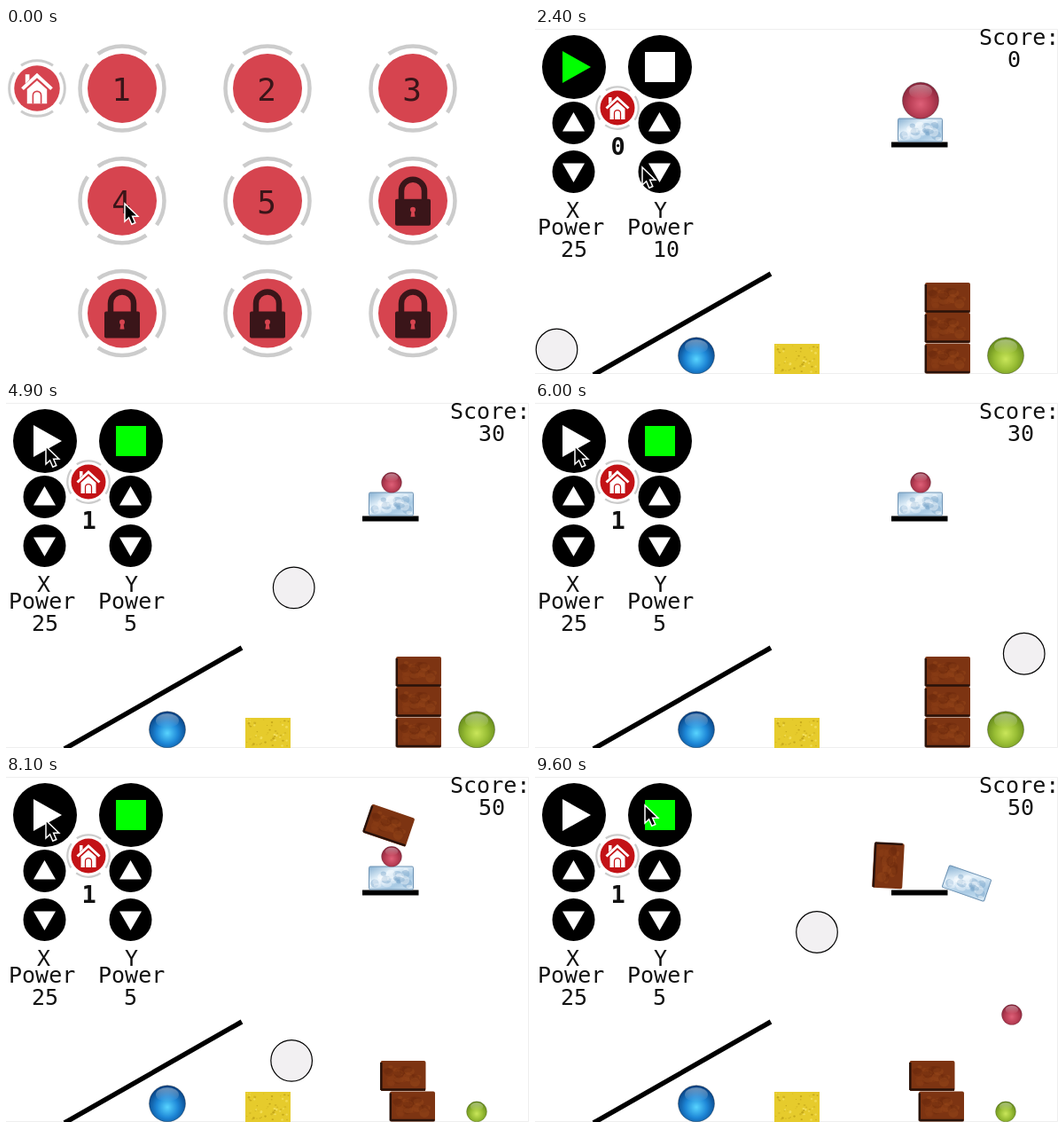
Write an HTML page that moves like this. It is 590 px wide and 390 px high and loops after 9.7 s.

```html
<!DOCTYPE html>
<html lang="en">
<head>
<meta charset="utf-8">
<title>Ball launcher</title>
<style>
  html, body { margin: 0; width: 100%; height: 100%; overflow: hidden; background: #fff; }
  svg { display: block; width: 590px; height: 390px; }
  text { font: 25px "DejaVu Sans Mono", monospace; fill: #111; }
  .count { font-size: 27px; font-weight: bold; }
  .level { font-size: 36px; fill: #3a1519; text-anchor: middle; }
</style>
</head>
<body>
<svg viewBox="0 0 590 390">
  <defs>
    <linearGradient id="iceFill" x2="1" y2="1">
      <stop offset="0" stop-color="#86b0d2"/><stop offset=".35" stop-color="#e4f1fa"/>
      <stop offset=".7" stop-color="#a9cae4"/><stop offset="1" stop-color="#d3e7f5"/>
    </linearGradient>
    <linearGradient id="gloss" x2="0" y2="1">
      <stop offset="0" stop-color="#fff" stop-opacity=".4"/>
      <stop offset="1" stop-color="#fff" stop-opacity="0"/>
    </linearGradient>
    <circle id="ring" r="47.5" fill="none" stroke="#ccc" stroke-width="4.5"
      pathLength="360" stroke-dasharray="70 20" stroke-dashoffset="35"/>
    <g id="home">
      <use href="#ring"/>
      <circle r="39"/>
      <path d="M-20-24h7v9l-7 7z" fill="#fff"/>
      <path d="M-17 0 0-15 17 0V26H-17z" fill="#fff"/>
      <path d="M-25 1 0-22 25 1" fill="none" stroke="#fff" stroke-width="6"/>
      <path d="M-18 1 0-15 18 1M-7 26V12a7 7 0 0 1 14 0V26" fill="none" stroke="currentColor" stroke-width="2.5"/>
    </g>
    <g id="lock">
      <path d="M-13 0V-11a13 13 0 0 1 26 0V0" fill="none" stroke="#3a1519" stroke-width="6.5"/>
      <rect x="-20" y="-2" width="40" height="30" rx="2" fill="#3a1519"/>
      <path d="M-1.5 11h3l1 7h-5z" fill="#d6444f"/><circle cy="10" r="3" fill="#d6444f"/>
    </g>
    <g id="brick"><rect x="-25.5" y="-17" width="51" height="34" rx="2" fill="#7d3412"/></g>
    <g id="ice"><rect x="-25" y="-13" width="50" height="26" rx="1.5" fill="url(#iceFill)" stroke="#6d92b3"/></g>
    <g id="sponge"><rect x="-25.5" y="-17" width="51" height="34" fill="#e6cb2c"/></g>
  </defs>

  <g id="menu"></g>

  <g id="game">
    <path d="M0 1.5H589.5V389.5H0" fill="none" stroke="#eee"/>
    <circle cx="44" cy="44" r="36"/><path id="play" d="M31 26V62L63 44z"/>
    <circle cx="141" cy="44" r="36"/><path id="stop" d="M124 27h34v34h-34z"/>
    <g id="arrows"></g>
    <use href="#home" transform="translate(93 90) scale(.5)" fill="#c31216" color="#c31216"/>
    <text id="tries" class="count" x="85.5" y="143"></text>
    <text x="35" y="214">X</text><text x="3" y="233">Power</text><text id="xPower" x="29" y="258"></text>
    <text x="134" y="214">Y</text><text x="104" y="233">Power</text><text id="yPower" x="133" y="258"></text>
    <text x="501" y="19">Score:</text><text id="score" x="533" y="44"></text>
    <path d="M66 391 266 277" stroke="#000" stroke-width="5.5"/>
    <path d="M402 128.5h63.5v6h-63.5z"/>
    <use href="#sponge" x="295.5" y="373"/>
    <g id="bodies"></g>
  </g>
  <path id="cursor" d="M0 0V20l4.6-4.2 3.2 7.4 4-1.7-3.2-7.3h6.2z" stroke="#fff" stroke-width="1.5"/>
</svg>
<script>
const LOOP = 9700, STEP = 100, GRAVITY = 450;
const LEVEL_OPEN = .5, LAUNCH = 3.1, RED_HIT = 4.15, GREEN_HIT = 6.1, TOPPLE = 8.55;
const $ = id => document.getElementById(id);

function add(parent, tag, attrs, text) {
  const node = document.createElementNS('http://www.w3.org/2000/svg', tag);
  for (const name in attrs) node.setAttribute(name, attrs[name]);
  if (text) node.textContent = text;
  return parent.appendChild(node);
}

let seed = 7;
const random = () => (seed = seed * 16807 % 2147483647) / 2147483647;

// Soft blotches inside a centred block
function speckle(id, count, w, h, size, colors, opacity) {
  for (let i = 0; i < count; i++) {
    const rx = size * (.4 + random() * .6), ry = rx * (.5 + random() * .5);
    add($(id), 'ellipse', {
      cx: (random() - .5) * (w - 2 * rx), cy: (random() - .5) * (h - 2 * ry),
      rx, ry, fill: colors[i % colors.length], opacity
    });
  }
}
speckle('brick', 26, 46, 28, 6, ['#9c4a1c', '#69290d', '#8d3f17'], .4);
add($('brick'), 'path', { d: 'M-25 15.5H25M-24.7-15V16', stroke: '#29120a', 'stroke-width': 2.5 });
speckle('ice', 26, 48, 24, 6, ['#fff', '#6c9cc2', '#f4faff'], .4);
speckle('sponge', 55, 49, 32, 1.5, ['#bd9f16', '#f4e062', '#cdb020'], .8);

function marble(light, mid, dark) {
  const id = 'glow' + light.slice(1);
  const glow = add(document.querySelector('defs'), 'radialGradient', { id, cx: .5, cy: .6, r: .6 });
  [light, mid, dark].forEach((color, i) => add(glow, 'stop', { offset: i / 2, 'stop-color': color }));
  const g = add($('bodies'), 'g');
  add(g, 'circle', { r: 20.5, fill: `url(#${id})`, stroke: '#0004' });
  add(g, 'ellipse', { cy: -10, rx: 13, ry: 8, fill: 'url(#gloss)' });
  return g;
}
const block = id => add($('bodies'), 'use', { href: '#' + id });

// Level menu
add($('menu'), 'use', {
  href: '#home', transform: 'translate(35 68) scale(.66)', fill: '#d6444f', color: '#d6444f'
});
for (let i = 0; i < 9; i++) {
  const x = 131 + i % 3 * 164, y = 68 + Math.floor(i / 3) * 126.7;
  const g = add($('menu'), 'g', { transform: `translate(${x} ${y})` });
  add(g, 'use', { href: '#ring' });
  add(g, 'circle', { r: 39, fill: '#d6444f' });
  if (i < 5) add(g, 'text', { class: 'level', x: -1, y: 14 }, String(i + 1));
  else add(g, 'use', { href: '#lock' });
}

// Power arrows
for (const x of [43.5, 140.5]) {
  for (const [y, flip] of [[107, 1], [162, -1]]) {
    const g = add($('arrows'), 'g', { transform: `translate(${x} ${y}) scale(1 ${flip})` });
    add(g, 'circle', { r: 24 });
    add(g, 'path', { d: 'M0-12 12.5 9.5h-25z', fill: '#fff' });
  }
}

const progress = (t, from, to) => Math.min(1, Math.max(0, (t - from) / (to - from)));
const ease = (t, from, to) => { const k = progress(t, from, to); return k * k * (3 - 2 * k); };
const fall = (t, start, y, floor) => Math.min(floor, y + GRAVITY / 2 * Math.max(0, t - start) ** 2);
const stepped = (t, first, ...changes) =>
  changes.reduce((value, [when, next]) => t >= when ? next : value, first);

// A free flight between each pair of bounces [seconds, x, y, angle]
function hop(bounces, t) {
  const next = bounces.findIndex(b => b[0] > t);
  if (next < 1) return bounces.at(next);
  const [t0, ...from] = bounces[next - 1], [t1, ...to] = bounces[next];
  const k = progress(t, t0, t1);
  const pose = from.map((v, i) => v + (to[i] - v) * k);
  pose[1] -= GRAVITY / 2 * (t - t0) * (t1 - t);
  return [t, ...pose];
}

const ballBounces = [
  [LAUNCH, 24.5, 362.5], [3.15, 60, 362], [RED_HIT, 410, 38], [5.17, 294, 333],
  [5.87, 554, 233], [GREEN_HIT, 550, 328], [6.87, 433.7, 298], [8.14, 318.5, 333], [9.6, 318, 176]
];
const brickBounces = [
  [GREEN_HIT, 465.5, 304, 0], [6.52, 330, 331, -53], [8.06, 433.5, 61, 375], [8.9, 398.5, 101, 453]
];
const cursorStops = [
  [.9, 35, 135], [1.4, 43, 105], [2.4, 121, 157], [LAUNCH, 45, 50], [9.6, 124, 33]
];

const ice = block('ice'), stack = [0, 1, 2].map(() => block('brick'));
const blue = marble('#58d4ff', '#1d86d6', '#063a7a');
const green = marble('#c9e65a', '#98bd34', '#5f8418');
const red = marble('#de6078', '#bb4057', '#84243a');
const ball = add($('bodies'), 'circle', { r: 23.3, stroke: '#000', 'stroke-width': 1.2 });

const place = (node, x, y, angle = 0, size = 1) =>
  node.setAttribute('transform', `translate(${x} ${y}) rotate(${angle}) scale(${size})`);

// Marbles shrink when hit but keep resting on their lowest point
function placeMarble(node, x, bottom, hit) {
  const size = hit ? .56 : 1;
  place(node, x, bottom - 20.8 * size, 0, size);
}

function draw(t) {
  const playing = t >= LAUNCH, inGame = t >= LEVEL_OPEN;
  $('menu').style.display = inGame ? 'none' : '';
  $('game').style.display = inGame ? '' : 'none';
  $('play').setAttribute('fill', playing ? '#fff' : '#0f0');
  $('stop').setAttribute('fill', playing ? '#0f0' : '#fff');
  $('tries').textContent = playing ? 1 : 0;
  $('xPower').textContent = stepped(t, 15, [1.5, 20], [1.8, 25]);
  $('yPower').textContent = stepped(t, 10, [2.6, 5]);
  $('score').textContent = stepped(t, 0, [RED_HIT, 30], [GREEN_HIT, 50]);

  placeMarble(blue, 182, 390);
  placeMarble(green, 531, fall(t, LEVEL_OPEN, 297, 390), t >= GREEN_HIT);
  const roll = 98 * Math.max(0, t - TOPPLE);
  placeMarble(red, 435 + roll, fall(t, TOPPLE + .16, 102.5, 390), t >= RED_HIT);

  const tip = progress(t, TOPPLE, 9.6) ** 2;
  place(ice, 434.5 + 52.5 * tip, 115 + 6 * tip, 19 * tip);

  const [, bx, by, turn] = hop(brickBounces, t), shove = ease(t, GREEN_HIT, 6.4);
  place(stack[0], 465.5 - 7 * shove, 372.5);
  place(stack[1], 465.5 - 17.5 * shove, 338);
  place(stack[2], bx, by, turn);

  const [, x, y] = hop(ballBounces, t);
  place(ball, x, playing ? y : fall(t, LEVEL_OPEN, 323, y));
  ball.setAttribute('fill', t < 1 ? '#fff' : '#f2f0f2');

  let cx = 134, cy = 198;
  for (const [arrive, sx, sy] of cursorStops) {
    const k = ease(t, arrive - .5, arrive);
    cx += (sx - cx) * k;
    cy += (sy - cy) * k;
  }
  place($('cursor'), cx, cy);
}

function tick() {
  draw(Math.floor(performance.now() % LOOP / STEP) * STEP / 1000);
  requestAnimationFrame(tick);
}
tick();
</script>
</body>
</html>
```
